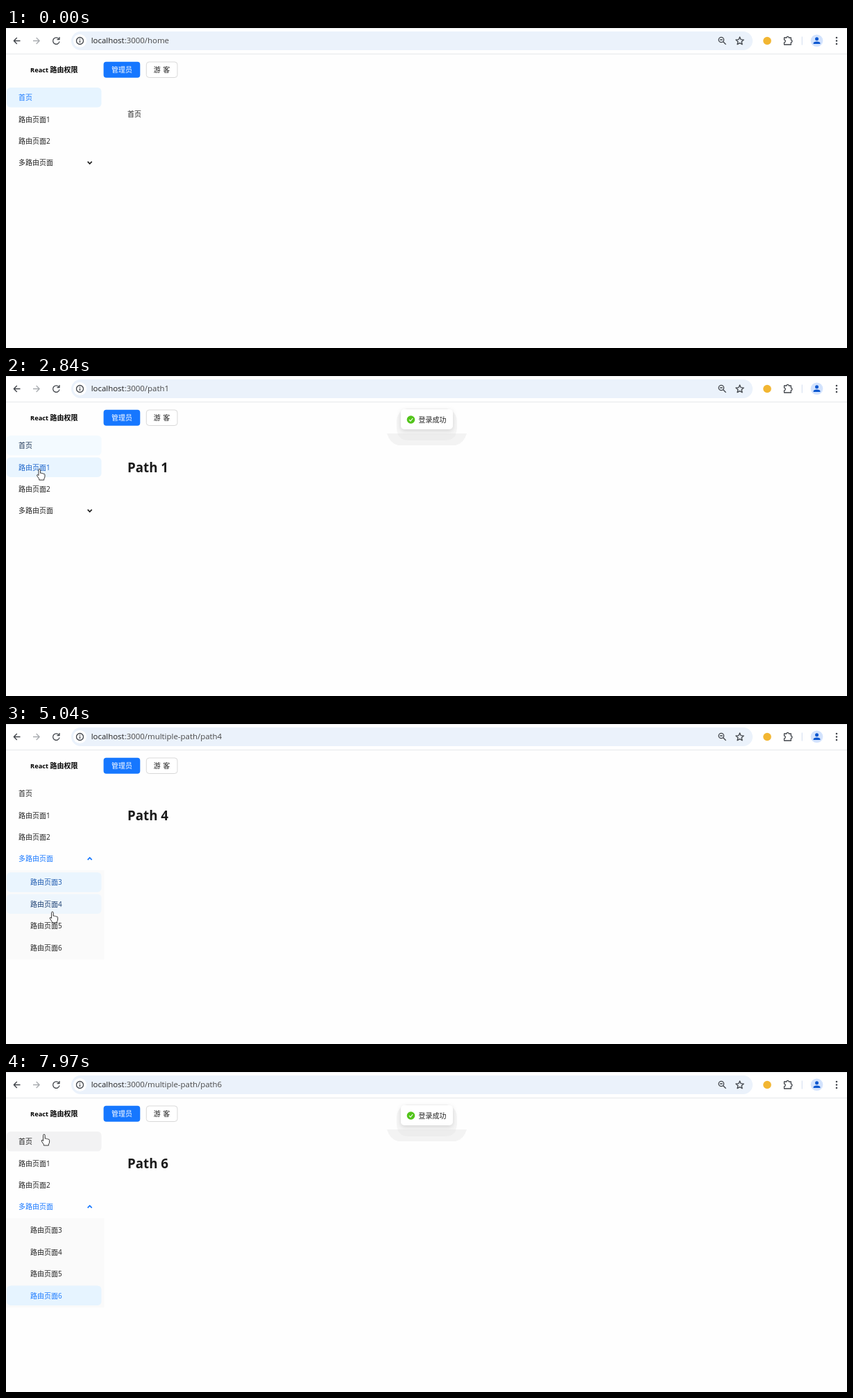
An HTML page that plays this animation: 1212 px wide and 462 px high, repeating every 8 s.

```html
<!DOCTYPE html>
<html lang="zh">
<head>
<meta charset="utf-8">
<title>React 路由权限</title>
<style>
  html, body { margin: 0; width: 100%; height: 100%; overflow: hidden; background: #fefefe; }
  svg { display: block; position: absolute; left: 0; top: 0; }
  text { font: 10px "Open Sans", "Noto Sans CJK SC", "Noto Sans CJK", sans-serif; fill: #1f1f1f; white-space: pre; }
  .bold { font-weight: 700; fill: #000; }
  .latin { font-size: 9.3px; }
  .heading { font-size: 18.7px; font-weight: 700; fill: #1a1a1a; }
  .url { font-size: 11.45px; fill: #474747; }
  .line { fill: none; stroke: #40444a; stroke-width: 1.3; stroke-linejoin: round; }
  .box { fill: #fff; filter: drop-shadow(0 2px 3px rgba(0, 0, 0, .13)); }
</style>
</head>
<body>
<svg width="1212" height="462" viewBox="0 0 1212 462">
  <defs>
    <clipPath id="fold"><rect id="foldRect" y="211" width="142" height="129"/></clipPath>
  </defs>

  <text class="bold latin" x="35" y="64">React</text>
  <text class="bold" x="63.5" y="64">路由权限</text>
  <rect id="admin" x="140.6" y="48.7" width="52.7" height="23" rx="4"/>
  <text x="152" y="64.3" style="fill:#fff">管理员</text>
  <rect id="guest" x="202.3" y="49" width="44.7" height="22.5" rx="4" fill="#fff"/>
  <g id="guestLabel">
    <text x="212.8" y="64.3" style="fill:inherit">游</text>
    <text x="226.3" y="64.3" style="fill:inherit">客</text>
  </g>

  <g id="menu"></g>
  <g id="submenu" clip-path="url(#fold)">
    <rect y="211" width="141.5" height="129" fill="#fafafa"/>
  </g>
  <path id="chevron" fill="none" stroke-width="1.7" d="M-3-1.6 0 1.5 3-1.6"/>

  <text id="home" x="175" y="128">首页</text>
  <text id="heading" class="heading" x="175" y="138.5"></text>

  <g id="toast">
    <path fill="#f3f3f3" d="M549 83H664Q660 97 648 100H565Q553 97 549 83Z"/>
    <rect x="563" y="47" width="87" height="46" rx="18" fill="#f5f5f5"/>
    <path fill="#ededed" d="M564 83H649Q645 93 632 93H581Q568 93 564 83Z"/>
    <rect class="box" x="569" y="48" width="75" height="29" rx="5"/>
    <circle cx="583.5" cy="63" r="5.8" fill="#52c41a"/>
    <path d="M581 63.2 583 65.2 586.2 61" fill="none" stroke="#fff" stroke-width="1.1"/>
    <text x="594.5" y="66.8">登录成功</text>
  </g>

  <g id="toolbar">
    <rect width="1212" height="37.5" fill="#fff"/>
    <rect width="1212" height="1" fill="#e9ebee"/>
    <rect y="37" width="1212" height="1" fill="#e6e8eb"/>
    <rect x="94" y="5" width="982" height="27" rx="13.5" fill="#ebf2fb"/>
    <path class="line" d="M20.5 18.5H11.5M15.8 14 11.3 18.5 15.8 23"/>
    <path class="line" style="stroke:#a9acb0" d="M39 18.5H48M43.7 14 48.2 18.5 43.7 23"/>
    <path class="line" d="M76.3 16A4.7 4.7 0 1 0 77 19.5M77 13V16.6H73.4"/>
    <circle cx="106.5" cy="18.5" r="9.5" fill="#fff"/>
    <circle class="line" cx="106.5" cy="18.5" r="5"/>
    <path class="line" d="M106.5 17.8V21.3M106.5 15.5V16.8"/>
    <text class="url" x="122.7" y="22.4"><tspan fill="#1f1f1f">localhost</tspan>:3000/<tspan id="path"></tspan></text>
    <circle class="line" cx="1030.8" cy="17" r="3.7"/>
    <path class="line" d="M1033.5 19.7 1037.5 23.7M1029 17H1032.6"/>
    <polygon id="star" class="line"/>
    <circle cx="1097" cy="18.5" r="5.8" fill="#f2b632"/>
    <path class="line" d="M1121.5 14H1125a1.6 1.6 0 0 1 3.2 0H1131.3V17.3a1.7 1.7 0 0 1 0 3.4V24H1121.5V20.8a1.8 1.8 0 0 0 0-3.6Z"/>
    <rect x="1146.7" y="12.5" width="1" height="12" fill="#cfdcef"/>
    <circle cx="1168.5" cy="18.3" r="8.8" fill="#d3e3fd"/>
    <circle cx="1168.5" cy="15.8" r="2.5" fill="#0b57d0"/>
    <path d="M1163.6 23V21.7Q1164 19.5 1168.5 19.4 1173 19.5 1173.4 21.7V23Z" fill="#0b57d0"/>
    <path d="M1197 14v9.1" stroke="#40444a" stroke-width="2.6" stroke-linecap="round" stroke-dasharray="0 4.5"/>
  </g>

  <g id="cursor" fill="#fff" stroke="#222" stroke-width=".9" stroke-linejoin="round">
    <path id="hand" d="M-1.4 9.5V1.4a1.3 1.3 0 0 1 2.6 0V6.2q1-.9 2.2.4 1.1-.7 2 .5 2-.6 2.2 1.3V11q0 2-1.2 3.2V16H-.6V14.6L-3.6 10q-.6-1.6.6-1.8.8 0 1.6 1.3Z"/>
    <path id="arrow" d="M0 0V11.5L2.7 9 4.5 13 6.2 12.2 4.5 8.4H8Z"/>
  </g>
</svg>
<script>
const LOOP = 8000, FADE = 150, TOAST_STAY = 3130;
const ROWS = 8, GROUP = 3, ROW_HEIGHT = 28.5;
const DARK = [31, 31, 31], BLUE = [22, 119, 255], LIGHT_BLUE = [64, 150, 255], BORDER = [217, 217, 217];

const $ = id => document.getElementById(id);
const ramp = (t, from, span) => Math.min(1, Math.max(0, (t - from) / span));
const ease = p => p * p * (3 - 2 * p);
const easeOut = p => 1 - (1 - p) ** 3;
const lerp = (a, b, p) => a + (b - a) * p;
const mix = (a, b, p) => `rgb(${a.map((v, i) => Math.round(lerp(v, b[i], p)))})`;
const show = (id, on) => $(id).style.display = on ? '' : 'none';

// Where the pointer rests; a stop with a target is clicked as the pointer leaves.
const stop = (arrive, leave, x, y, target) => ({ arrive, leave, x, y, target });
const STOPS = [
  stop(240, 240, 405, 408),
  stop(920, 1390, 163, 58, 'login'),
  stop(1570, 1570, 115, 129),
  stop(1900, 2320, 47, 107),
  stop(2500, 2740, 47, 127, 1),
  stop(3120, 3260, 55, 168, 2),
  stop(3590, 3870, 59, 200, GROUP),
  stop(4290, 4440, 64, 238, 4),
  stop(4850, 5040, 67, 271, 5),
  stop(5280, 5420, 68, 292, 6),
  stop(5740, 6040, 69, 320, 7),
  stop(6340, 6340, 535, 347),
  stop(6800, 6850, 291, 76),
  stop(7060, 7400, 229, 54, 'login'),
  stop(7640, 7690, 291, 78),
  stop(7970, LOOP, 55, 90)
];
const LOGINS = STOPS.filter(s => s.target === 'login').map(s => s.leave);
const FOLD_TIME = STOPS.find(s => s.target === GROUP).leave;
const ROUTES = [{ leave: -LOOP, target: 0 }, ...STOPS.filter(s => s.target > 0 && s.target !== GROUP)];

const rowTop = i => 86 + 31.4 * i + (i > GROUP ? 2.6 : 0);
const pageNumber = i => i > GROUP ? i - 1 : i;
const rowLabel = i => i === 0 ? '首页' : i === GROUP ? '多路由页面' : '路由页面' + pageNumber(i);
const address = i => i === 0 ? 'home' : (i > GROUP ? 'multiple-path/' : '') + 'path' + pageNumber(i);

function add(parent, tag, attrs) {
  const el = document.createElementNS('http://www.w3.org/2000/svg', tag);
  for (const key in attrs) el.setAttribute(key, attrs[key]);
  return parent.appendChild(el);
}

const rows = Array.from({ length: ROWS }, (_, i) => {
  const nested = i > GROUP, top = rowTop(i);
  const parent = $(nested ? 'submenu' : 'menu');
  const plate = fill => add(parent, 'rect', { x: 1, y: top, width: 136.5, height: ROW_HEIGHT, rx: 5.5, fill });
  const hover = plate('#eeeeef');
  const active = plate('#e6f4ff');
  const text = add(parent, 'text', { x: nested ? 35 : 18, y: top + 18.2 });
  text.textContent = rowLabel(i);
  return { hover, active, text };
});

$('star').setAttribute('points', Array.from({ length: 10 }, (_, i) => {
  const r = i % 2 ? 2.7 : 6, a = Math.PI * i / 5;
  return [1057.5 + r * Math.sin(a), 18.9 - r * Math.cos(a)];
}).join(' '));

function pointerAt(t) {
  const i = STOPS.findLastIndex(s => s.arrive <= t);
  if (i < 0) return { x: -99, y: -99 };
  const a = STOPS[i], b = STOPS[i + 1] || a;
  const p = ease(ramp(t, a.leave, b.arrive - a.leave || 1));
  return { x: lerp(a.x, b.x, p), y: lerp(a.y, b.y, p) };
}

const within = (left, top, width, height) => ({ x, y }) =>
  x > left && x < left + width && y > top && y < top + height;
const onRow = i => within(1, rowTop(i), 136.5, ROW_HEIGHT);
const onAdmin = within(141, 49, 52, 23);
const onGuest = within(202, 49, 45, 23);
const onMenu = within(0, 86, 138, 254);

// Share of the last moments that the pointer spent on an area.
function hoverLevel(t, inside) {
  const samples = 8;
  let hits = 0;
  for (let k = 0; k < samples; k++) hits += inside(pointerAt(t - k * FADE / samples));
  return hits / samples;
}

function drawMenu(t) {
  const step = ROUTES.findLastIndex(r => r.leave <= t);
  const { leave, target: current } = ROUTES[step];
  const previous = step ? ROUTES[step - 1].target : -1;
  const p = ramp(t, leave - 90, 250);
  const group = current < GROUP ? 0 : previous > GROUP ? 1 : p;

  rows.forEach(({ hover, active, text }, i) => {
    const amount = i === current ? p : i === previous ? 1 - p : 0;
    active.style.opacity = Math.sqrt(amount);
    hover.style.opacity = i === current ? 0 : hoverLevel(t, onRow(i));
    text.style.fill = mix(DARK, BLUE, i === GROUP ? group : amount);
  });

  const open = ease(ramp(t, FOLD_TIME, 280));
  $('path').textContent = address(current);
  $('heading').textContent = current ? 'Path ' + pageNumber(current) : '';
  show('home', current === 0);
  $('foldRect').setAttribute('height', 129 * open);
  $('chevron').setAttribute('transform', `translate(120.7 194.5) scale(1 ${1 - 2 * open})`);
  $('chevron').style.stroke = mix(DARK, BLUE, group);
}

function drawButtons(t) {
  const guest = hoverLevel(t, onGuest);
  $('admin').style.fill = mix(BLUE, LIGHT_BLUE, hoverLevel(t, onAdmin));
  $('guest').style.stroke = mix(BORDER, LIGHT_BLUE, guest);
  $('guestLabel').style.fill = mix(DARK, LIGHT_BLUE, guest);
}

function drawToast(t) {
  const age = t - (LOGINS.findLast(login => login <= t) ?? Infinity);
  const visible = easeOut(ramp(age, 0, 300)) * (1 - ease(ramp(age, TOAST_STAY, 300)));
  $('toast').style.opacity = visible;
  $('toast').setAttribute('transform', `translate(0 ${-34 * (1 - visible)})`);
}

function drawPointer(t) {
  const at = pointerAt(t);
  const clickable = [onMenu, onAdmin, onGuest].some(inside => inside(at));
  show('hand', clickable);
  show('arrow', !clickable);
  $('cursor').setAttribute('transform', `translate(${at.x} ${at.y})`);
}

function draw() {
  const t = performance.now() % LOOP;
  drawMenu(t);
  drawButtons(t);
  drawToast(t);
  drawPointer(t);
  requestAnimationFrame(draw);
}
draw();
</script>
</body>
</html>
```
